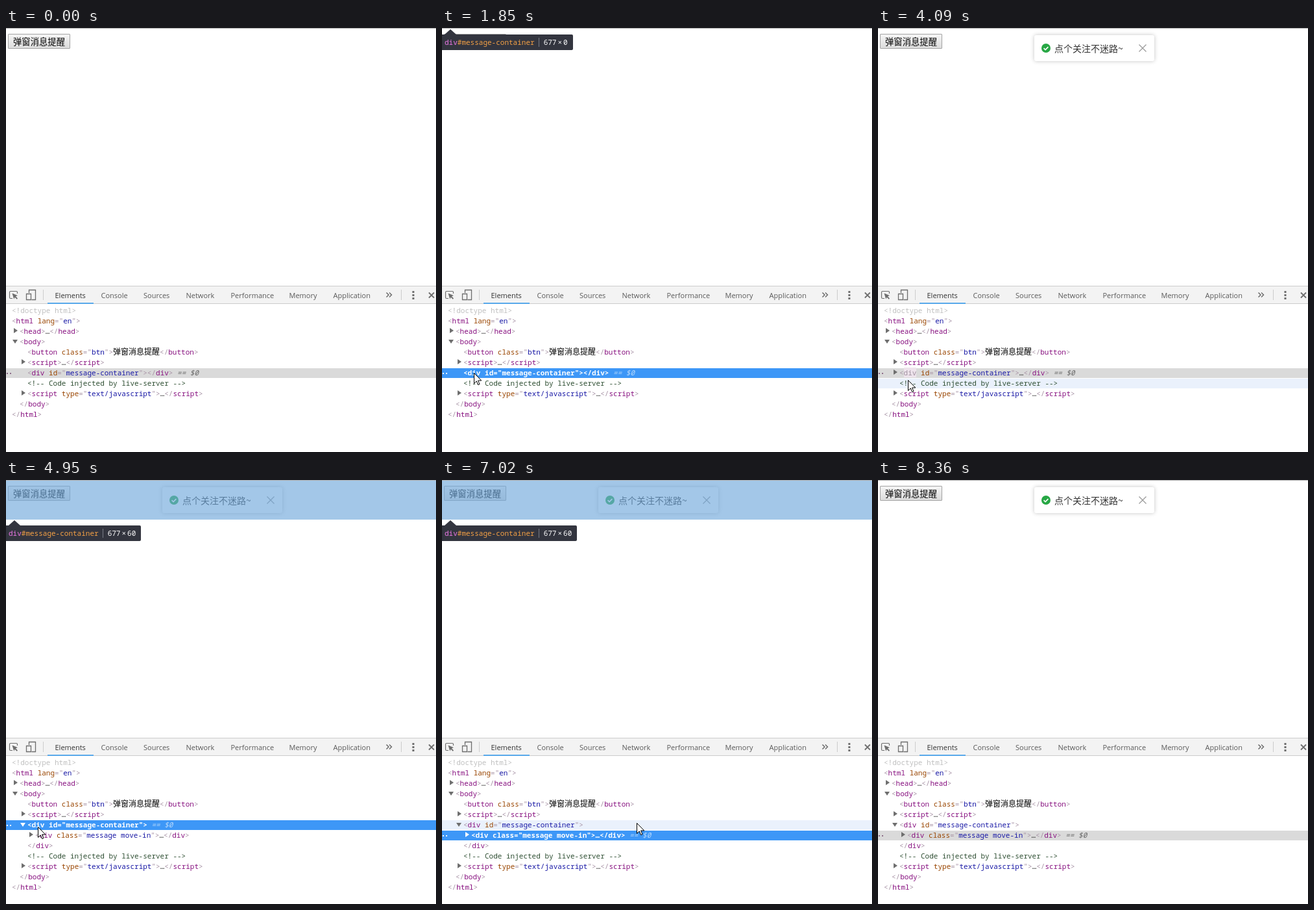
These frames come from a looping animation (663 by 653 pixels, 8.44 s). An HTML page:

```html
<!DOCTYPE html>
<html lang="zh-CN">
<head>
<meta charset="utf-8">
<title>Message popup</title>
<style>
html, body { margin: 0; width: 100%; height: 100%; overflow: hidden; background: #fff; }
#stage { position: relative; width: 663px; height: 653px; overflow: hidden; background: #fff; }
#stage div, #stage > svg { position: absolute; box-sizing: border-box; white-space: pre; }
#page { left: 0; top: 0; width: 663px; height: 397px; overflow: hidden; border-top: 1px solid #b0b0b0;
  font-family: "Noto Sans CJK SC", "Noto Sans CJK", sans-serif; }
#btn { left: 3px; top: 8px; width: 96px; height: 23px; border: 1px solid #a3a3a3; border-radius: 1px;
  background: linear-gradient(#f5f5f5, #dcdcdc); font-size: 13.33px; line-height: 22px; text-align: center; color: #000; }
#btn.down { background: linear-gradient(#dcdcdc, #efefef); }
#msg { left: 241px; top: 10px; width: 185px; height: 40px; border-radius: 3px; background: #fff;
  box-shadow: 0 0 6px rgba(0,0,0,.24); color: #333; font-size: 14px; line-height: 40px; }
#msg span { position: absolute; left: 31px; top: 0; }
#msg svg { position: absolute; left: 0; top: 0; }
#margin { border: 0 solid rgba(246,178,107,.7); }
#pad { width: 100%; height: 100%; border: 0 solid rgba(147,196,125,.55);
  background: rgba(111,168,220,.64); background-clip: padding-box; }
#tip { height: 24px; padding: 0 8px; border-radius: 2px; background: #33353f; color: #fff; line-height: 23px; }
#tip::before { content: ""; position: absolute; left: 8px; top: -8px; border: solid transparent;
  border-width: 0 9px 8px; border-bottom-color: #33353f; }
#tip i { display: inline-block; width: 1px; height: 14px; margin: 0 7px 0 6px; background: #777a84; vertical-align: -3px; }
#tip u { margin: 0 2px; text-decoration: none; }
#tip .el { color: #ee78e6; } #tip .id { color: #f5a145; } #tip .cl { color: #a3c8ef; }
#tip, #tree { font-family: "Noto Sans Mono", "DejaVu Sans Mono", "Noto Sans CJK SC", monospace; font-size: 11px; }
#bar { left: 0; top: 397px; width: 663px; height: 28px; border: solid #ccc; border-width: 1px 0; background: #f3f3f3;
  font: 11px/27px "Open Sans", "Noto Sans", sans-serif; color: #5a5a5a; }
#bar div { top: 0; }
#bar svg { position: absolute; left: 0; top: -1px; }
#tree { left: 0; top: 425px; width: 663px; height: 228px; }
.row { left: 0; width: 663px; height: 15px; line-height: 15px; color: #a894a6; }
.row.hover { background: #eaf1fc; }
.row.sel { background: #dadada; }
.row.sel.blue { background: #3d97f7; }
.row .code { top: -1px; }
.row .n { color: #881280; } .row .a { color: #994500; } .row .v { color: #1a1aa6; }
.row .c { color: #2f4f33; } .row .d { color: #c0c0c0; } .row .t { color: #222; }
.row .zh { color: #000; font: 12px/0 "Noto Sans CJK SC", "Noto Sans CJK", sans-serif; }
.row em { display: none; color: #666; font-weight: 400; }
.row.sel em { display: inline; }
.row.blue .code { color: #fff; font-weight: 600; }
.row.blue span { color: #fff !important; }
.row.blue em { color: #b9dafc; }
.row .dots { display: none; left: 1px; top: 7px; width: 7px; height: 2px;
  background: linear-gradient(90deg, #8c6c88 0 2px, transparent 2px 5px, #8c6c88 5px); }
.row.sel .dots { display: block; }
.row.blue .dots { background: linear-gradient(90deg, #fff 0 2px, transparent 2px 5px, #fff 5px); }
.row .arrow { width: 0; height: 0; border: solid transparent; }
.row .right { top: 2px; border-width: 4px 0 4px 6px; border-left-color: #6e6e6e; }
.row .open { top: 4px; border-width: 6px 4px 0; border-top-color: #6e6e6e; }
.row.blue .right { border-left-color: #fff; }
.row.blue .open { border-top-color: #fff; }
</style>
</head>
<body>
<div id="stage">
  <div id="page">
    <div id="btn">弹窗消息提醒</div>
    <div id="msg">
      <svg width="185" height="40" fill="none">
        <circle cx="18" cy="20" r="7" fill="#27a744"/>
        <path d="M14.6 20.2l2.5 2.4 4.3-4.5" stroke="#fff" stroke-width="1.6"/>
        <path d="M161.500 14.500l11 11m0-11l-11 11" stroke="#999" stroke-width="1.2"/>
      </svg>
      <span>点个关注不迷路~</span>
    </div>
    <div id="margin"><div id="pad"></div></div>
    <div id="tip"></div>
  </div>
  <div id="bar">
    <svg width="663" height="28" fill="none" stroke="#6e6e6e">
      <path d="M10 19.500H7q-1.500 0-1.500-1.500V10q0-1.500 1.500-1.500h9q1.500 0 1.500 1.500v2" stroke-width="1.2"/>
      <path d="M9.500 11.500l8.500 3.500-3 1.300 3 3.200-1.300 1.300-3.100-3-1.400 2.700z" fill="#6e6e6e" stroke="none"/>
      <path d="M35.500 11V6.500h10v15h-6M31.500 12.500h7v9h-7z" stroke-width="1.3"/>
      <path d="M57.500 6v16M609.500 6v16" stroke="#ccc"/>
      <path d="M586.500 10.500l3.500 3.500-3.500 3.500m4.500-7l3.500 3.500-3.500 3.500" stroke-width="1.5"/>
      <path d="M628 8v3m0 2v3m0 2v3" stroke-width="3"/>
      <path d="M652 10.500l8 8m0-8l-8 8" stroke-width="1.8"/>
      <path d="M64 27h71" stroke="#59a9ea" stroke-width="2"/>
    </svg>
  </div>
  <div id="tree"></div>
  <svg id="cursor" width="14" height="21" style="left:0;top:0">
    <path d="M.5.5V16.500L4.300 12.900 6.700 18.600 9 17.600 6.600 12H11.800Z" fill="#fff" stroke="#000"/>
  </svg>
</div>
<script>
const LOOP = 8440;
const INSERT = 3100, EXPAND = 4680, PICK = 5530;
const $ = id => document.getElementById(id);

// Toolbar labels
[["Elements", 75.5], ["Console", 146.5], ["Sources", 212], ["Network", 277.5],
 ["Performance", 346.5], ["Memory", 436.5], ["Application", 504.5]].forEach(([text, x], i) => {
  const tab = document.createElement("div");
  tab.textContent = text;
  tab.style.left = x + "px";
  if (!i) tab.style.color = "#333";
  $("bar").append(tab);
});

// Markup helpers for the element tree
const span = (cls, text) => `<span class="${cls}">${text}</span>`;
const attr = (name, value) => ` ${span("a", name)}="${span("v", value)}"`;
const open = (name, attrs = "") => `&lt;${span("n", name)}${attrs}&gt;`;
const close = name => `&lt;/${span("n", name)}&gt;`;
const more = span("t", "…");
const box = attr("id", "message-container");
const whileEmpty = t => t < INSERT;
const whileClosed = t => t >= INSERT && t < EXPAND;
const whileOpen = t => t >= EXPAND;

// indent, markup, arrow, highlighted element, selectable key, visibility
const rows = [
  [9, span("d", "&lt;!doctype html&gt;")],
  [9, open("html", attr("lang", "en")), "", "html"],
  [21, open("head") + more + close("head"), "right"],
  [21, open("body"), "open", "body"],
  [33, open("button", attr("class", "btn")) + span("zh", "弹窗消息提醒") + close("button"), "", "button"],
  [33, open("script") + more + close("script"), "right"],
  [33, open("div", box) + close("div"), "", "box", "box", whileEmpty],
  [33, open("div", box).replace('class="n"', 'class="n" id="flash"') + more + close("div"), "right", "box", "box", whileClosed],
  [33, open("div", box), "open", "box", "box", whileOpen],
  [45, open("div", attr("class", "message move-in")) + more + close("div"), "right", "msg", "msg", whileOpen],
  [33, close("div"), "", "box", "", whileOpen],
  [33, span("c", "&lt;!-- Code injected by live-server --&gt;")],
  [33, open("script", attr("type", "text/javascript")) + more + close("script"), "right"],
  [21, close("body"), "", "body"],
  [9, close("html"), "", "html"]
].map(([x, html, arrow, target, key, shown]) => {
  const el = document.createElement("div");
  el.className = "row";
  const mark = arrow ? `<div class="arrow ${arrow}" style="left:${x - (arrow === "open" ? 11 : 9)}px"></div>` : "";
  el.innerHTML = `<div class="dots"></div>${mark}<div class="code" style="left:${x}px">${html}<em> == $0</em></div>`;
  $("tree").append(el);
  return { el, target, key, shown };
});

// Inspector highlights: margin rectangle, border widths, label
const areas = {
  html: { rect: [-5, 0, 677, 40], label: ["html"], size: [677, 40] },
  body: { rect: [-5, 0, 677, 40], margin: "8px", label: ["body"], size: [661, 24] },
  button: { rect: [3, 8, 96, 23], pad: "1px 6px", label: ["button", "cl", ".btn"], size: [96, 23] },
  empty: { rect: [-5, 0, 677, 0], label: ["div", "id", "#message-container"], size: [677, 0] },
  box: { rect: [-5, 0, 677, 60], label: ["div", "id", "#message-container"], size: [677, 60] },
  msg: { rect: [241, 0, 185, 60], margin: "10px 0", pad: "0 10px",
         label: ["div", "cl", ".message.move-in"], size: [185.39, 40] }
};
let shownArea;
function showArea(name) {
  if (name === shownArea) return;
  shownArea = name;
  const area = areas[name];
  $("margin").style.display = $("tip").style.display = area ? "" : "none";
  if (!area) return;
  const [x, y, w, h] = area.rect;
  $("margin").style.cssText = `left:${x}px;top:${y}px;width:${w}px;height:${h}px;border-width:${area.margin || 0}`;
  $("pad").style.borderWidth = area.pad || 0;
  $("tip").style.cssText = `left:${x + 1}px;top:${y + h + 9}px`;
  const [tag, cls, rest] = area.label;
  $("tip").innerHTML = span("el", tag) + (rest ? span(cls, rest) : "") + `<i></i>${area.size.join("<u>×</u>")}`;
}

// Pointer stops: time, x, y
const path = [
  [70, 572, 645], [110, 570, 624], [310, 330, 541], [590, 330, 541], [1230, 49, 531], [1850, 49, 531],
  [2700, 62, 40], [2900, 60, 22], [3570, 60, 22], [4090, 46, 542], [4230, 38, 566], [4400, 26, 530],
  [4860, 26, 530], [5220, 171, 552], [5980, 171, 552], [6070, 214, 552], [6840, 214, 552],
  [6950, 290, 540], [7550, 539, 240], [7810, 539, 240], [8310, 575, 654]
];
const clamp = v => Math.min(1, Math.max(0, v));
const smooth = v => v * v * (3 - 2 * v);
const mix = (a, b, k) => a + (b - a) * k;
const blend = (a, b, k) => `rgb(${a.map((v, i) => Math.round(mix(v, b[i], k)))})`;

function pointer(t) {
  const i = path.findIndex(p => p[0] > t);
  if (i < 1) return null;
  const [t0, x0, y0] = path[i - 1], [t1, x1, y1] = path[i];
  const k = smooth((t - t0) / (t1 - t0));
  return [Math.round(mix(x0, x1, k)), Math.round(mix(y0, y1, k))];
}

function drawFlash(t) {
  const age = t - INSERT, style = $("flash").style;
  const live = age >= 0 && age < 1400;
  const k = 1 - Math.pow(1 - clamp(age / 1120), 2.7);
  style.background = live ? blend([158, 54, 153], [238, 228, 236], k) : "";
  style.color = live ? blend([255, 255, 255], [160, 146, 160], clamp((age - 250) / 700)) : "";
}

function draw(t) {
  const at = pointer(t);
  $("cursor").style.display = at ? "" : "none";
  if (at) $("cursor").style.transform = `translate(${at[0]}px,${at[1]}px)`;

  const focus = (t >= 1570 && t < INSERT) || (t >= 4580 && t < 8330);
  const picked = t < PICK ? "box" : "msg";
  const hovered = at && at[1] >= 425 ? Math.floor((at[1] - 428) / 16) : -1;
  let line = 0, target;
  for (const { el, target: owner, key, shown } of rows) {
    const visible = !shown || shown(t);
    el.style.display = visible ? "" : "none";
    if (!visible) continue;
    const sel = key === picked;
    el.style.top = 3 + line * 16 + "px";
    el.className = "row" + (line === hovered ? " hover" : "") + (sel ? " sel" : "") + (sel && focus ? " blue" : "");
    if (line === hovered) target = owner;
    line++;
  }
  showArea(target === "box" && t < INSERT ? "empty" : target || "none");
  drawFlash(t);

  const k = smooth(clamp((t - INSERT) / 260));
  $("msg").style.opacity = k;
  $("msg").style.transform = `translateY(${(k - 1) * 40}px)`;
  $("btn").className = t >= 3030 && t < INSERT ? "down" : "";
}

const start = performance.now();
function tick() {
  draw((performance.now() - start) % LOOP);
  requestAnimationFrame(tick);
}
tick();
</script>
</body>
</html>
```
